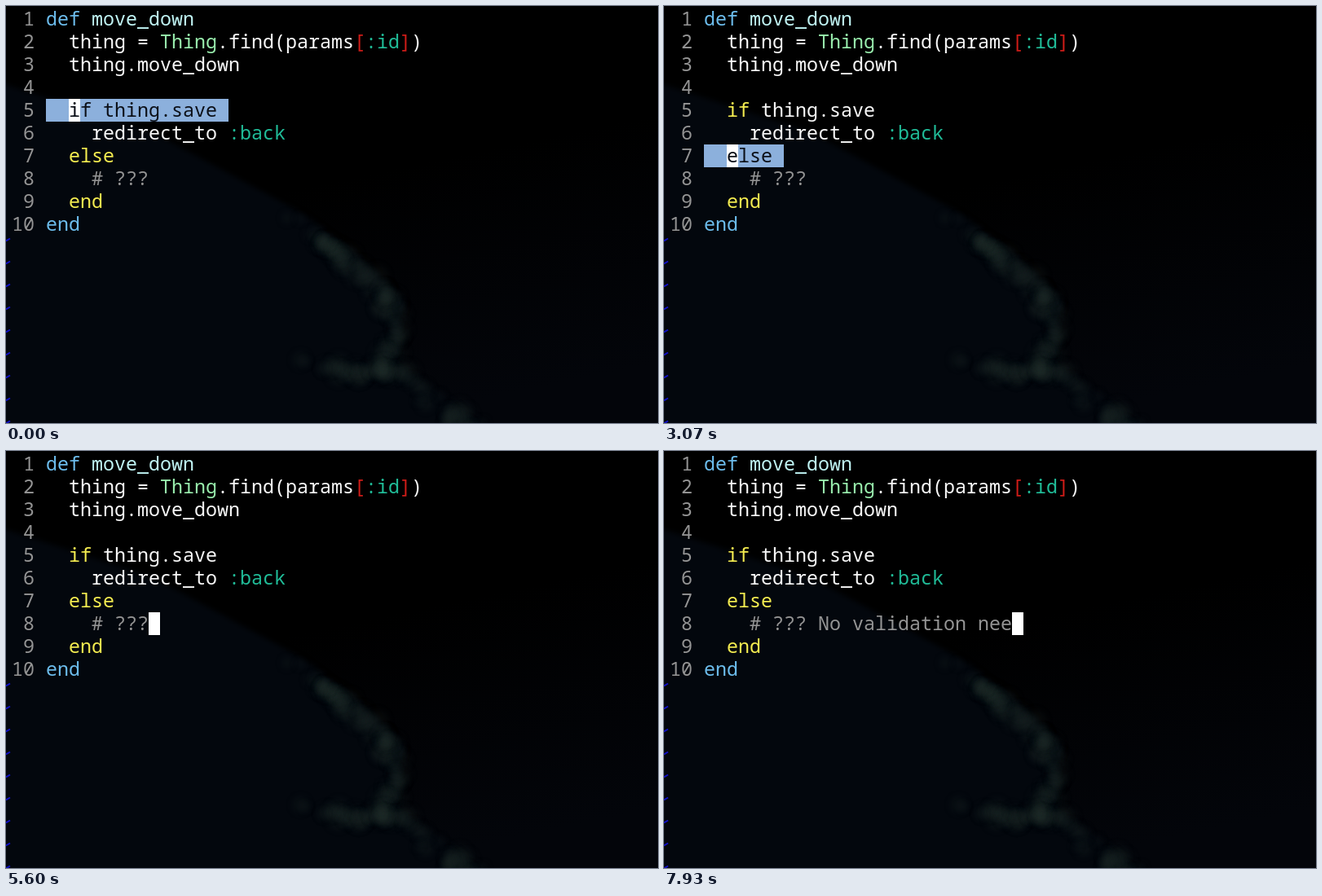
Animation, 800 px wide and 512 px high, one loop 8000 ms. Source, as an HTML page with a canvas:

```html
<!DOCTYPE html>
<html lang="en">
<head>
<meta charset="utf-8">
<title>Editor session</title>
<style>
  html, body { margin: 0; width: 800px; height: 512px; overflow: hidden; background: #000; }
  canvas { display: block; }
</style>
</head>
<body>
<canvas id="stage" width="800" height="512"></canvas>
<script>
const ctx = document.getElementById('stage').getContext('2d');
const LOOP = 8000, CELL = 14, ROW = 28, LEFT = 49;
const WHITE = '#f8f8f8', YELLOW = '#f4ec50', BLUE = '#6cbcec', PALE = '#c0f4f4', LIME = '#98ecac',
      GREEN = '#20bc98', RED = '#d01c18', GREY = '#949494', SELECTION = '#8cb0dc', DARK = '#0c1018';

// Each line is a list of [text, colour] runs.
const lines = [
  [['def ', BLUE], ['move_down', PALE]],
  [['  thing = ', WHITE], ['Thing', LIME], ['.find(params', WHITE], ['[', RED], [':id', GREEN], [']', RED], [')', WHITE]],
  [['  thing.move_down', WHITE]],
  [],
  [['  if', YELLOW], [' thing.save', WHITE]],
  [['    redirect_to ', WHITE], [':back', GREEN]],
  [['  else', YELLOW]],
  [['    # ???', GREY]],
  [['  end', YELLOW]],
  [['end', BLUE]],
];
const FIRST_ROW = 4, COMMENT_ROW = 7;
const FIRST_MOVE = 1870, MOVE_EVERY = 800, DESELECT_AFTER = 670;
const APPEND_AT = 5300, TYPE_START = 5900, TYPE_STEP = 110;
const typed = ' No validation nee';

const clamp = (value, min, max) => Math.max(min, Math.min(max, value));
const colX = col => LEFT + col * CELL;
const rowY = row => row * ROW + 2;
const backdrop = makeBackdrop();

// A dark hillside with soft foliage scattered along its lower edge
function makeBackdrop() {
  const canvas = document.createElement('canvas');
  canvas.width = 800;
  canvas.height = 512;
  const g = canvas.getContext('2d');
  let seed = 7;
  const random = () => (seed = seed * 16807 % 2147483647) / 2147483647;

  const sky = g.createLinearGradient(380, 220, 440, 512);
  sky.addColorStop(0, '#000');
  sky.addColorStop(1, '#03050a');
  g.fillStyle = sky;
  g.fillRect(0, 0, 800, 512);

  const crest = [[365, 255], [425, 300], [488, 360], [482, 440]];
  const slope = [[370, 430], [482, 440], [590, 515]];
  g.filter = 'blur(3px)';
  g.fillStyle = '#03070d';
  g.beginPath();
  [[-20, 90], [180, 155], ...crest, [590, 515], [-20, 540]].forEach(([x, y]) => g.lineTo(x, y));
  g.fill();

  g.filter = 'blur(5px)';
  g.fillStyle = 'rgba(40, 54, 52, 0.2)';
  for (const path of [crest, slope]) {
    for (let i = 1; i < path.length; i++) {
      const [x0, y0] = path[i - 1], [x1, y1] = path[i];
      for (let n = 0; n < 22; n++) {
        const k = random();
        g.beginPath();
        g.arc(x0 + (x1 - x0) * k - random() * 22, y0 + (y1 - y0) * k + random() * 18, 4 + random() * 9, 0, 7);
        g.fill();
      }
    }
  }
  return canvas;
}

function drawText(text, col, row, color) {
  ctx.fillStyle = color;
  [...text].forEach((ch, i) => ctx.fillText(ch, colX(col + i), rowY(row) + 22));
}

function drawCells(col, row, count, color) {
  ctx.fillStyle = color;
  ctx.fillRect(colX(col), rowY(row), count * CELL, ROW);
}

function draw(time) {
  ctx.drawImage(backdrop, 0, 0);
  ctx.font = '300 23.33px "Noto Sans Mono", "DejaVu Sans Mono", monospace';

  // Each move steps down a row, selects it, then drops the selection.
  const sinceStart = time - FIRST_MOVE + MOVE_EVERY;
  const moved = clamp(Math.floor(sinceStart / MOVE_EVERY), 0, COMMENT_ROW - FIRST_ROW);
  const row = FIRST_ROW + moved;
  const selected = row < COMMENT_ROW && sinceStart - moved * MOVE_EVERY < DESELECT_AFTER;
  const count = clamp(Math.floor((time - TYPE_START) / TYPE_STEP) + 1, 0, typed.length);

  lines.forEach((runs, i) => {
    drawText(String(i + 1).padStart(2), -3, i, GREY);
    const content = i === COMMENT_ROW ? [...runs, [typed.slice(0, count), GREY]] : runs;
    const full = content.map(([text]) => text).join('');
    const highlighted = i === row && selected;
    if (highlighted) drawCells(0, i, full.length + 1, SELECTION);
    let col = 0;
    for (const [text, color] of content) {
      drawText(text, col, i, highlighted ? DARK : color);
      col += text.length;
    }
    if (i === row) {
      const cursor = time < APPEND_AT ? 2 : full.length;
      drawCells(cursor, i, 1, '#fff');
      drawText(full[cursor] || '', cursor, i, DARK);
    }
  });

  // Clipped tildes marking the rows past the end of the file
  ctx.strokeStyle = '#1010c8';
  ctx.lineWidth = 2;
  ctx.beginPath();
  for (let y = 287; y < 512; y += ROW) {
    ctx.moveTo(0, y + 1.5);
    ctx.lineTo(5, y - 1.5);
  }
  ctx.stroke();
}

function tick() {
  draw(performance.now() % LOOP);
  requestAnimationFrame(tick);
}
tick();
</script>
</body>
</html>
```
